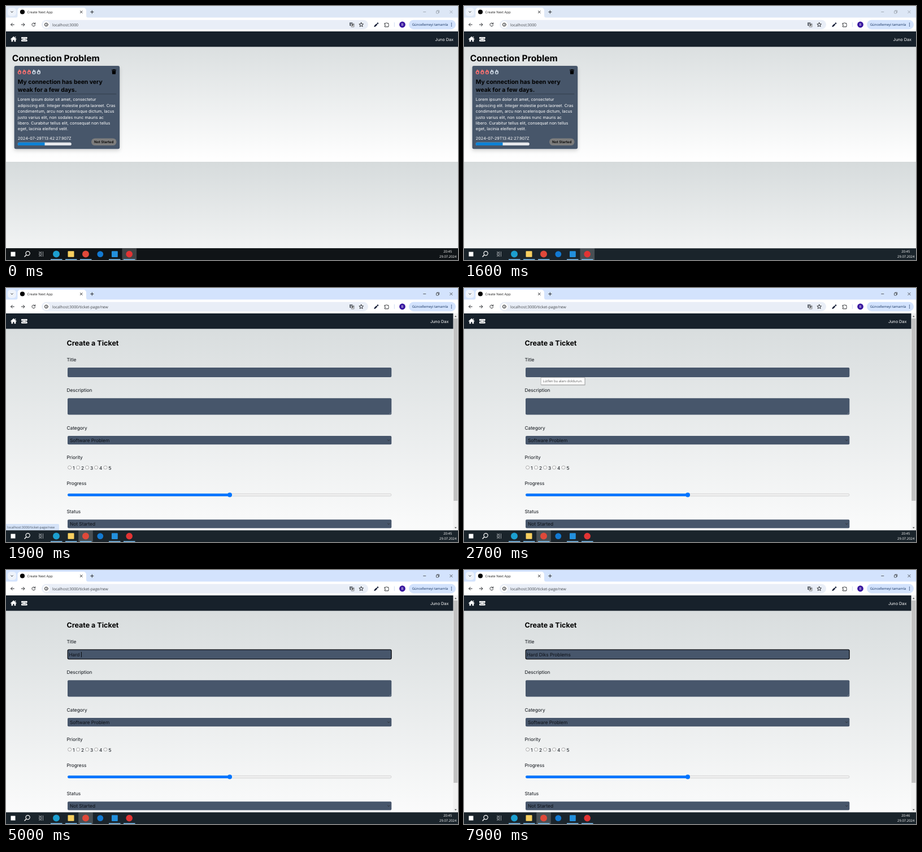
An HTML page for the animation above (8000 ms loop, 800 px wide and 450 px high).

```html
<!DOCTYPE html>
<html lang="en">
<head>
<meta charset="utf-8">
<title>Ticket app</title>
<style>
html, body { margin: 0; width: 100%; height: 100%; overflow: hidden; background: #fff; }
svg { display: block; width: 800px; height: 450px; }
text { font-family: Inter, sans-serif; white-space: pre; text-rendering: geometricPrecision; }
.ui text, text.ui { font-family: "Open Sans", "Noto Sans", sans-serif; font-size: 5.95px; fill: #1f1f1f; }
.base text { font-size: 8.33px; fill: #0c1016; }
.small { font-size: 7.29px; fill: #fff; }
.line { fill: none; stroke: #2b2d30; stroke-width: 1; stroke-linecap: round; stroke-linejoin: round; }
.field { fill: #47566b; }
.bold { font-weight: 700; }
.end { text-anchor: end; }
.mid { text-anchor: middle; }
</style>
</head>
<body>
<svg viewBox="0 0 800 450">
  <defs>
    <linearGradient id="fade" x1="0" y1="0" x2="0" y2="1">
      <stop offset="0" stop-color="#d6dbdc"/><stop offset="1" stop-color="#fff"/>
    </linearGradient>
    <filter id="shadow" x="-10%" y="-10%" width="120%" height="125%">
      <feDropShadow dx="0" dy="3" stdDeviation="3" flood-opacity=".16"/>
    </filter>
    <path id="flame" fill-rule="evenodd" d="M2.7 0C3 2 .2 3.4.2 5.8a3.2 3.2 0 0 0 6.4 0C6.6 4 5.9 2.6 5.1 1.6 5 2.4 4.7 2.8 4.4 3 4.2 1.7 3.6.7 2.7 0ZM3.4 4C4.2 4.6 4.9 5.2 4.9 6.2a1.5 1.5 0 0 1-3 0C1.9 5.5 2.2 5.1 2.5 4.8L3 5.4Z"/>
    <path id="chevron" class="line" d="M-1.7-.8 0 .9 1.7-.8" stroke-width="1.1"/>
  </defs>

  <!-- home page -->
  <g id="home">
    <rect y="45" width="800" height="231" fill="url(#fade)"/>
    <rect y="276" width="800" height="231" fill="url(#fade)"/>
    <text class="bold" x="10.7" y="97.8" font-size="15.6">Connection Problem</text>
    <rect class="field" x="14.6" y="106" width="186.6" height="147.3" rx="3" filter="url(#shadow)"/>
    <g id="flames"></g>
    <path d="M187 112.7h2.5l.6-.8h2l.6.8h2.3v1.2H187ZM187.6 114.5h6.8l-.5 6.2h-5.8Z"/>
    <g class="bold" font-size="10.42">
      <text x="20.8" y="137.6">My connection has been very</text>
      <text x="20.8" y="152.2">weak for a few days.</text>
    </g>
    <rect x="20.8" y="155.6" width="174.4" height=".7" fill="#29333f"/>
    <g id="body"></g>
    <text class="small" x="20.8" y="237.2">2024-07-29T13:42:27.907Z</text>
    <rect x="20.8" y="241.7" width="95" height="5.4" rx="2.7" fill="#e5e7eb"/>
    <path d="M23.5 241.7H68.5V247.1H23.5a2.7 2.7 0 0 1 0-5.4Z" fill="#0c82d6"/>
    <rect x="151" y="234.5" width="44.5" height="12.6" rx="6.3" fill="#7d7d7d"/>
    <text class="mid" x="173.2" y="243" font-size="6.25" font-weight="600">Not Started</text>
  </g>

  <!-- new ticket form -->
  <g id="form">
    <rect y="45" width="800" height="435" fill="url(#fade)"/>
    <text class="bold" x="107.4" y="102.2" font-size="12.5">Create a Ticket</text>
    <g class="base">
      <g id="labels"></g>
      <rect class="field" x="109" y="141" width="573.3" height="17" rx="2"/>
      <rect class="field" x="109" y="195.3" width="573.3" height="29.2" rx="2"/>
      <path d="M678.5 223.5l3-3M680.3 223.5l1.2-1.2" stroke="#a4abb5" stroke-width=".5"/>
      <rect class="field" x="109" y="262" width="573.3" height="15.2" rx="2"/>
      <rect class="field" x="109" y="410.2" width="573.3" height="15.2" rx="2"/>
      <text x="113" y="272.6">Software Problem</text>
      <text x="113" y="420.9">Not Started</text>
      <use href="#chevron" x="677.3" y="269.7"/>
      <use href="#chevron" x="677.3" y="418"/>
      <g id="radios" fill="#fff" stroke="#767676" stroke-width=".6"></g>
      <rect x="109.3" y="364.4" width="572.7" height="4.3" rx="2.1" fill="#efefef" stroke="#b8b8b8" stroke-width=".5"/>
      <rect x="109" y="364.2" width="288" height="4.7" rx="2.3" fill="#0075ff"/>
      <circle cx="396" cy="366.5" r="4" fill="#0075ff"/>
      <g id="focus">
        <rect x="108.2" y="140.2" width="574.9" height="18.6" rx="2.6" fill="none" stroke="#fff" stroke-width=".5"/>
        <rect x="109.2" y="141.2" width="572.9" height="16.6" rx="2" fill="none" stroke="#0b0d11" stroke-width="1.3"/>
      </g>
      <text id="typed" x="111.4" y="152.6"></text>
      <rect id="caret" y="145" width=".9" height="9.6"/>
    </g>
    <g id="tip">
      <rect x="136.8" y="159.6" width="78" height="13" fill="#000" opacity=".15"/>
      <rect x="136.1" y="158.8" width="77.8" height="12.6" fill="#fff" stroke="#767676" stroke-width=".5"/>
      <text class="ui" x="139.6" y="167.2" style="fill:#575757">Lütfen bu alanı doldurun.</text>
    </g>
  </g>

  <!-- site header -->
  <rect y="45" width="800" height="27.3" fill="#17212b"/>
  <path fill="#fff" d="M13.4 53.8 18.8 58.7 18 59.5 17.3 58.9V63.3H14.6V60.2H12.2V63.3H9.5V58.9L8.8 59.5 8 58.7ZM15.9 54.2h1.4v2.2l-1.4-1.2Z"/>
  <path fill="#fff" fill-rule="evenodd" d="M27.9 55h8.9a.9.9 0 0 1 .9.9V57.6a1.3 1.3 0 0 0 0 2.6V61.8a.9.9 0 0 1-.9.9H27.9a.9.9 0 0 1-.9-.9V60.2a1.3 1.3 0 0 0 0-2.6V55.9a.9.9 0 0 1 .9-.9ZM29.4 56.7V61H35.3V56.7ZM30 57.3H34.7V60.4H30Z"/>
  <text id="user" class="small end" x="792" y="61.7">Juno Dax</text>
  <g id="scroll">
    <rect x="791.5" y="45" width="8.5" height="384.5" fill="#f1f1f1"/>
    <rect x="792.2" y="54" width="7.1" height="323" fill="#c1c1c1"/>
    <path d="M793.9 51.2 795.8 49 797.7 51.2ZM793.9 423.8 795.8 426 797.7 423.8Z" fill="#505050"/>
  </g>
  <g id="status">
    <path d="M0 418H92a2 2 0 0 1 2 2V429.5H0Z" fill="#d5e3f8"/>
    <text class="ui" x="2" y="425.8" style="font-size:5.8px;fill:#4a5563">localhost:3000/ticket-page/new</text>
  </g>

  <!-- browser frame -->
  <g class="ui">
    <rect id="strip" width="800" height="24" fill="#d3e3fd"/>
    <rect y="20.5" width="800" height="24.5" fill="#fff"/>
    <rect x="3" y="3.2" width="15" height="14.6" rx="5" fill="#eef3fb"/>
    <use href="#chevron" x="10.5" y="10.5"/>
    <path d="M16.5 21a4 4 0 0 0 4-4V8a5 5 0 0 1 5-5H137a5 5 0 0 1 5 5V17a4 4 0 0 0 4 4Z" fill="#fff"/>
    <circle cx="29" cy="10.5" r="4.1"/>
    <text x="37.5" y="12.7">Create Next App</text>
    <path class="line" d="M131.3 8.7l3.8 3.8M135.1 8.7l-3.8 3.8M149.7 10.6h5.2M152.3 8v5.2"/>
    <g id="winctl" fill="none" stroke="#222" stroke-width=".7">
      <path d="M738.3 10.5h5M785.4 8l5 5M790.4 8l-5 5"/>
      <rect x="761.5" y="9" width="4" height="4" rx=".6"/>
      <path d="M762.8 9V7.9H766.6V11.7H765.5"/>
    </g>
    <path class="line" d="M14.3 33H8.7M11.2 30.4 8.6 33l2.6 2.6M27.3 33h5.6M30.4 30.4 33 33l-2.6 2.6M51.3 31.4A2.9 2.9 0 1 0 51.7 33.7M51.7 29.8v2H49.7"/>
    <rect x="63" y="24.7" width="578" height="16.6" rx="8.3" fill="#e9eef7"/>
    <circle cx="71.3" cy="33" r="6" fill="#fff"/>
    <circle class="line" cx="71.3" cy="33" r="2.9" stroke-width=".8"/>
    <path class="line" d="M71.3 32.7v1.7M71.3 31.3v.1" stroke-width=".8"/>
    <text id="url" x="82" y="35.6" style="font-size:6.82px;fill:#42464b"></text>
    <rect x="608" y="29.3" width="5.4" height="5.6" rx=".6" fill="#59606a"/>
    <rect x="611" y="31.2" width="5.2" height="6" rx=".6" fill="#fff" stroke="#59606a" stroke-width=".7"/>
    <path class="line" d="M612.2 33h2.8M613.6 32.3v.7M614.4 33l-2 2.6M612.8 33.6l1.8 2" stroke-width=".5"/>
    <text x="609" y="34" style="font-size:4.6px;fill:#fff">G</text>
    <path class="line" stroke-width=".8" d="M628.7 29.3l1.1 2.5 2.7.2-2.1 1.8.7 2.7-2.4-1.5-2.4 1.5.7-2.7-2.1-1.8 2.7-.2Z"/>
    <path d="M651.4 37.2l.6-2.4 3.6-3.6 1.8 1.8-3.6 3.6ZM656.2 30.6l.9-.9a1.2 1.2 0 0 1 1.8 1.8l-.9.9Z" fill="#101a33"/>
    <path class="line" stroke-width=".9" d="M670.4 30.6h2.1a1.2 1.2 0 0 1 2.3 0h2v2.1a1.2 1.2 0 0 1 0 2.2v2h-6.4v-2a1.1 1.1 0 0 0 0-2.2Z"/>
    <path d="M687.4 29v8" stroke="#c5d5ee" stroke-width=".8"/>
    <circle cx="701.5" cy="33" r="5.4" fill="#3a18a0"/>
    <text class="mid" x="701.5" y="35.2" style="fill:#fff">B</text>
    <rect x="713" y="24.7" width="83" height="16.6" rx="8.3" fill="#d3e3fd"/>
    <text x="718.8" y="35.2" style="fill:#12305e">Güncellemeyi tamamla</text>
    <path d="M788.5 30.4v.01M788.5 33v.01M788.5 35.6v.01" stroke="#12305e" stroke-width="1.5" stroke-linecap="round"/>
  </g>

  <!-- taskbar -->
  <rect y="429.3" width="800" height="21" fill="#1a242b"/>
  <rect id="dim" y="429.3" width="800" height="21" fill="#101417"/>
  <rect id="active" y="429.3" width="25.6" height="20.7" fill="#fff" opacity=".2"/>
  <rect x="8.5" y="435.6" width="8" height="8" fill="#fff"/>
  <g fill="none" stroke="#fff">
    <circle cx="38.6" cy="438.2" r="3.6" stroke-width="1.2"/>
    <path d="M36 440.9l-3.4 3.5" stroke-width="1.4"/>
    <path d="M58.8 435v1.3h4v-1.3M58.8 444v-1.3h4V444M58.8 438h4v3h-4ZM65.5 435v9" stroke-width=".7" stroke="#ccd0d3"/>
  </g>
  <circle cx="89" cy="439.6" r="6" fill="#1c9fd0"/>
  <rect x="109.5" y="434.3" width="11" height="10.4" rx=".8" fill="#f7cf5f"/>
  <circle cx="141" cy="439.6" r="6" fill="#e0493a"/>
  <circle cx="166.8" cy="439.6" r="5.4" fill="#1279d2"/>
  <rect x="187" y="434.2" width="10.8" height="10.8" rx="1" fill="#2390dd"/>
  <circle cx="218.2" cy="439.6" r="5.8" fill="#e23434"/>
  <g id="bars" fill="#7cbdec"></g>
  <g class="ui mid">
    <text id="clock" x="781.8" y="437.3" style="fill:#fff"></text>
    <text x="782.2" y="446.3" style="fill:#fff">29.07.2024</text>
  </g>
</svg>

<script>
const LOOP = 8000, NAV = 1900, FOCUS = 3100;
const TITLE = "Hard Diks Problems";
// key press time of each character of TITLE
const KEYS = [3700, 3950, 4100, 4300, 4750, 5400, 5500, 5620, 5740, 5900, 6080,
              7000, 7050, 7100, 7150, 7200, 7250, 7300];
const $ = id => document.getElementById(id);

function add(parent, tag, attrs, text = "") {
  const el = document.createElementNS("http://www.w3.org/2000/svg", tag);
  for (const key in attrs) el.setAttribute(key, attrs[key]);
  el.textContent = text;
  $(parent).append(el);
}

for (let i = 0; i < 5; i++) {
  add("flames", "use", { href: "#flame", x: 20.5 + i * 8.5, y: 112, fill: i < 3 ? "#f87171" : "#cbd5e1" });
}
[
  "Lorem ipsum dolor sit amet, consectetur",
  "adipiscing elit. Integer molestie porta laoreet. Cras",
  "condimentum, arcu non scelerisque dictum, lacus",
  "justo varius elit, non sodales nunc mauris ac",
  "libero. Curabitur tellus elit, consequat non tellus",
  "eget, lacinia eleifend velit."
].forEach((line, i) => add("body", "text", { class: "small", x: 20.8, y: 168.3 + i * 10.42 }, line));

const labels = { Title: 129.5, Description: 183.8, Category: 250.5, Priority: 303, Progress: 348.8, Status: 398.9 };
for (const name in labels) add("labels", "text", { x: 107.4, y: labels[name] }, name);

[112.6, 127.5, 143.6, 159.6, 176].forEach((x, i) => {
  add("radios", "circle", { cx: x, cy: 318, r: 3 });
  add("labels", "text", { x: x + 5.5, y: 321.5 }, i + 1);
});
[79, 105, 131, 182, 208].forEach(x => add("bars", "rect", { x, y: 448.4, width: 20.5, height: 1.6 }));

const show = (id, on) => { $(id).style.display = on ? "" : "none"; };

function render(t) {
  const onForm = t >= NAV;
  show("home", !onForm);
  show("form", onForm);
  show("scroll", onForm);
  show("status", onForm && t < 2400);
  show("tip", t >= 2600 && t < FOCUS);
  show("focus", t >= FOCUS);
  $("url").textContent = "localhost:3000" + (onForm ? "/ticket-page/new" : "");
  $("user").setAttribute("x", onForm ? 783.4 : 792);
  $("strip").setAttribute("fill", onForm ? "#d3e3fd" : "#dde7f6");
  $("winctl").setAttribute("stroke", onForm ? "#222" : "#8b929b");
  $("active").setAttribute("x", onForm ? 128.2 : 205.5);
  $("dim").setAttribute("opacity", Math.max(0, 1 - t / 1000));
  $("clock").textContent = t < 5800 ? "20:45" : "20:46";

  const count = KEYS.filter(k => k <= t).length;
  const typed = $("typed");
  typed.textContent = TITLE.slice(0, count);
  const since = t - (count ? KEYS[count - 1] : FOCUS);
  show("caret", since >= 0 && since % 1000 < 500);
  $("caret").setAttribute("x", 111.6 + (count ? typed.getComputedTextLength() : 0));
}

const start = performance.now();
function tick() {
  render((performance.now() - start) % LOOP);
  requestAnimationFrame(tick);
}
tick();
</script>
</body>
</html>
```
